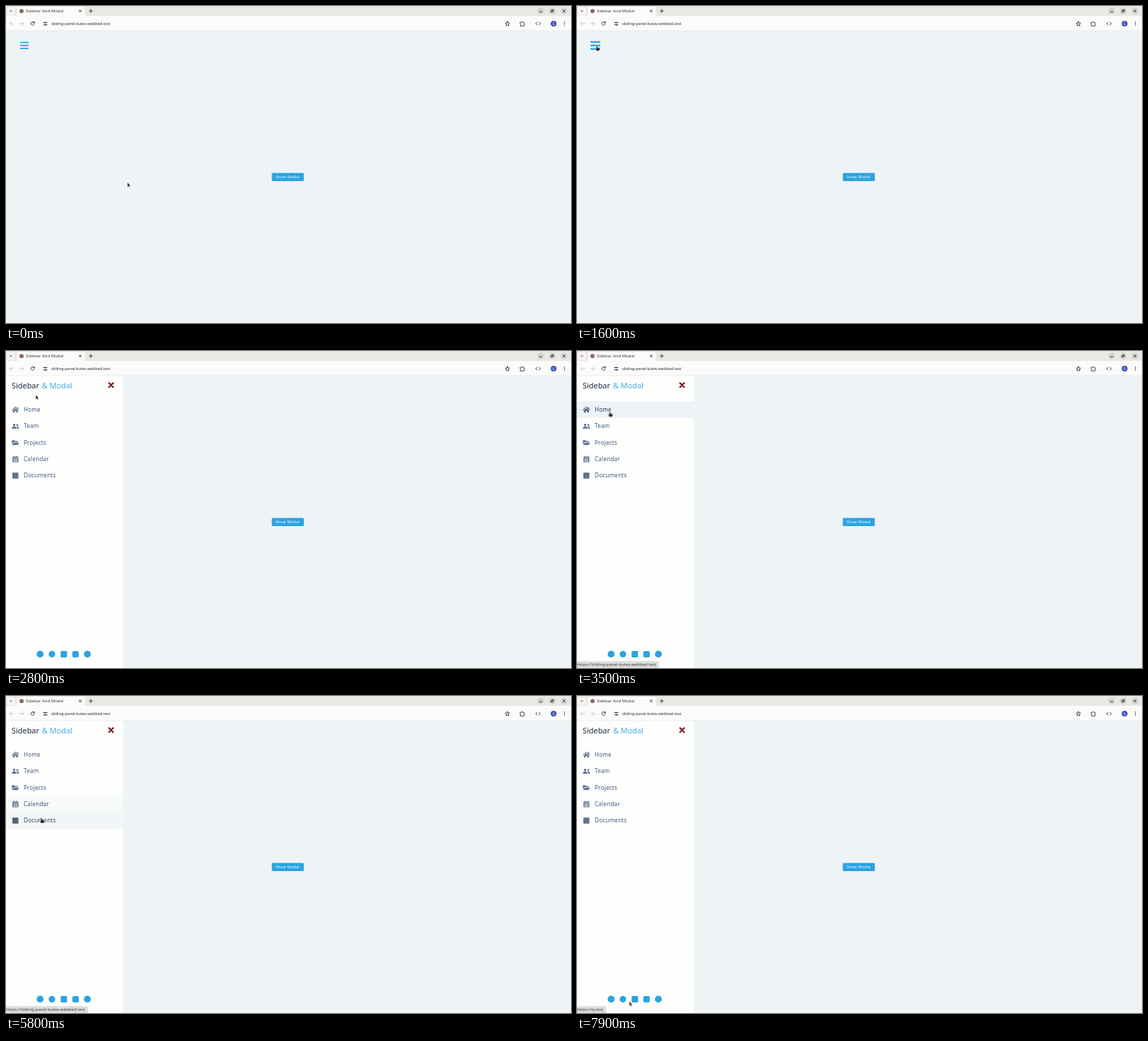
An HTML page that plays this animation: 800 by 449 pixels, repeating every 8 s.

```html
<!DOCTYPE html>
<html lang="en">
<head>
<meta charset="utf-8">
<title>Sidebar And Modal</title>
<style>
  html, body { margin: 0; width: 100%; height: 100%; overflow: hidden; background: #eef3f6; }
  svg { display: block; width: 100vw; height: 100vh; }
  text { font-family: "Noto Sans", "Open Sans", sans-serif; white-space: pre; }

  .ink { fill: none; stroke: #333; stroke-width: .9; stroke-linecap: round; stroke-linejoin: round; }
  .dim { stroke: #c2c2c0; }
  .blue { fill: #2ba3e1; }
  .title { font-size: 10.9px; font-weight: 500; fill: #1f2b3b; }
  .accent { fill: #4aa9e2; }
  .label { font-size: 8.1px; font-weight: 500; letter-spacing: .22px; }
  .status { font-size: 6.1px; fill: #3c3c3c; }

  .burger { transform-origin: 26px 55.9px; animation: bounce 2s ease-in-out infinite; }
  @keyframes bounce { 50% { transform: scale(1.5); } }

  .sidebar { animation: slide 8s infinite; }
  @keyframes slide {
    0%, 20.69% { transform: translateX(-166px); animation-timing-function: ease; }
    26.94%, 100% { transform: none; }
  }

  /* menu rows: each one lights up while the pointer is over it */
  .row { color: #455a7a; }
  .row, .back { animation: 8s ease infinite; }
  .back { fill: #edf2f6; opacity: 0; }
  .icon { fill: currentColor; opacity: .85; }
  .label { fill: currentColor; }
  .home { animation-name: home-ink; }       .home .back { animation-name: home; }
  .team { animation-name: team-ink; }       .team .back { animation-name: team; }
  .projects { animation-name: proj-ink; }   .projects .back { animation-name: proj; }
  .calendar { animation-name: cal-ink; }    .calendar .back { animation-name: cal; }
  .documents { animation-name: doc-ink; }   .documents .back { animation-name: doc; }
  @keyframes home { 0%, 38.1% { opacity: 0 } 41.9%, 47.5% { opacity: 1 } 51.3%, 100% { opacity: 0 } }
  @keyframes team { 0%, 47.5% { opacity: 0 } 51.3%, 57.4% { opacity: 1 } 61.2%, 100% { opacity: 0 } }
  @keyframes proj { 0%, 57.4% { opacity: 0 } 61.2%, 65.6% { opacity: 1 } 69.4%, 100% { opacity: 0 } }
  @keyframes cal { 0%, 65.6% { opacity: 0 } 69.4%, 71% { opacity: 1 } 74.8%, 100% { opacity: 0 } }
  @keyframes doc { 0%, 71% { opacity: 0 } 74.8%, 82% { opacity: 1 } 85.8%, 100% { opacity: 0 } }
  @keyframes home-ink { 0%, 38.1%, 51.3%, 100% { color: #455a7a } 41.9%, 47.5% { color: #2c4361 } }
  @keyframes team-ink { 0%, 47.5%, 61.2%, 100% { color: #455a7a } 51.3%, 57.4% { color: #2c4361 } }
  @keyframes proj-ink { 0%, 57.4%, 69.4%, 100% { color: #455a7a } 61.2%, 65.6% { color: #2c4361 } }
  @keyframes cal-ink { 0%, 65.6%, 74.8%, 100% { color: #455a7a } 69.4%, 71% { color: #2c4361 } }
  @keyframes doc-ink { 0%, 71%, 85.8%, 100% { color: #455a7a } 74.8%, 82% { color: #2c4361 } }

  /* link address in the corner */
  .page { animation: page 8s step-end infinite; }
  .social { animation: social 8s step-end infinite; }
  @keyframes page { 0% { visibility: hidden } 40% { visibility: visible } 84.9%, 100% { visibility: hidden } }
  @keyframes social { 0% { visibility: hidden } 93.7%, 100% { visibility: visible } }

  .pointer { animation: move 8s linear infinite; }
  @keyframes move {
    0% { transform: translate(172px, 250px) }
    2.5% { transform: translate(150px, 215px) }
    5% { transform: translate(100px, 130px) }
    7.5% { transform: translate(52px, 50px) }
    8.75% { transform: translate(38px, 29px) }
    10% { transform: translate(31px, 38px) }
    11.25% { transform: translate(28px, 50px) }
    15%, 30% { transform: translate(28px, 55.5px) }
    35% { transform: translate(42px, 62px) }
    41.25%, 42.5% { transform: translate(46px, 82px) }
    47.5% { transform: translate(47px, 95px) }
    55% { transform: translate(47px, 114px) }
    65% { transform: translate(48px, 138px) }
    71% { transform: translate(49px, 166px) }
    72.5% { transform: translate(50px, 172px) }
    76.25% { transform: translate(50px, 178px) }
    77.5%, 80% { transform: translate(54px, 179px) }
    82.5% { transform: translate(56px, 195px) }
    87.5% { transform: translate(70px, 330px) }
    91.25% { transform: translate(77px, 422px) }
    93.75% { transform: translate(67px, 428px) }
    96.25% { transform: translate(68px, 430px) }
    98.75%, 100% { transform: translate(74px, 432.5px) }
  }
  .arrow { fill: #222; animation: arrow 8s step-end infinite; }
  .hand { fill: #222; animation: hand 8s step-end infinite; }
  .pointer path { stroke: #fff; stroke-width: .5; }
  @keyframes arrow {
    0%, 24.4%, 82%, 98%, 100% { visibility: visible }
    10.6%, 38.1%, 92.9% { visibility: hidden }
  }
  @keyframes hand {
    0%, 24.4%, 82%, 98%, 100% { visibility: hidden }
    10.6%, 38.1%, 92.9% { visibility: visible }
  }
</style>
</head>
<body>
<svg viewBox="0 0 800 449" preserveAspectRatio="none">
  <rect width="800" height="449" fill="#eef3f6"/>

  <g class="burger blue">
    <rect x="20" y="50.7" width="12" height="1.9" rx=".4"/>
    <rect x="20" y="54.9" width="12" height="1.9" rx=".4"/>
    <rect x="20" y="59.2" width="12" height="1.9" rx=".4"/>
  </g>

  <rect class="blue" x="376.4" y="236.5" width="45.3" height="11.6" rx="1.4"/>
  <text x="381.7" y="244.2" font-size="5.3" letter-spacing=".36" font-weight="500" fill="#fff">Show Modal</text>

  <g class="sidebar">
    <rect y="35" width="165.5" height="414" fill="#fefffd"/>
    <text class="title" x="8" y="53.3">Sidebar</text>
    <text class="title accent" x="51" y="53.3">&amp; Modal</text>
    <path d="M145.9 45.4l5.8 5.8m0-5.8l-5.8 5.8" fill="none" stroke="#7d1c26" stroke-width="2.3" stroke-linecap="round"/>

    <g class="row home">
      <rect class="back" y="71.4" width="165.5" height="23.4"/>
      <path class="icon" transform="translate(13.3 83)" d="M-5.2.2L0-4.2 2.6-2V-3.6H3.8V-1L5.2.2 4.6.9 0-3-4.6.9ZM-3.5 1L0-2 3.5 1V4H1V1.5H-1V4H-3.5Z"/>
      <text class="label" x="25" y="85.9">Home</text>
    </g>
    <g class="row team">
      <rect class="back" y="94.8" width="165.5" height="23.4"/>
      <path class="icon" transform="translate(13.3 106.3)" d="M-3.6-1.6a1.8 1.8 0 1 1 3.6 0a1.8 1.8 0 1 1-3.6 0ZM-5 3.6Q-5 .8-3 .8H-.6Q1.4.8 1.4 3.6ZM1.4-1.3a1.4 1.4 0 1 1 2.8 0a1.4 1.4 0 1 1-2.8 0ZM2.3 3.6H5V2.6Q5 .9 3.4.9H1.5Q2.4 1.9 2.3 3.6Z"/>
      <text class="label" x="25" y="109.2">Team</text>
    </g>
    <g class="row projects">
      <rect class="back" y="118.2" width="165.5" height="23.4"/>
      <path class="icon" transform="translate(13.3 129.7)" d="M-5 2.6V-2.6Q-5-3.4-4.2-3.4H-1.6L-.4-2.2H2.6Q3.4-2.2 3.4-1.4V-.6H-2.8ZM-4.6 3.5L-2.5 0H5.3L3.3 3.5Z"/>
      <text class="label" x="25" y="132.6">Projects</text>
    </g>
    <g class="row calendar">
      <rect class="back" y="141.6" width="165.5" height="23.4"/>
      <g transform="translate(13.3 153)">
        <path class="icon" d="M-4.2-3.3H-2.7V-4.6H-1.5V-3.3H1.5V-4.6H2.7V-3.3H4.2V-1.6H-4.2ZM-4.2-1H4.2V4.5H-4.2Z"/>
        <path d="M-3.3.8H3.3M-3.3 2.8H3.3M-1.3-.5V4M1.3-.5V4" stroke="#fefffd" stroke-width=".6"/>
      </g>
      <text class="label" x="25" y="155.9">Calendar</text>
    </g>
    <g class="row documents">
      <rect class="back" y="165" width="165.5" height="23.4"/>
      <rect class="icon" x="9" y="172.2" width="8.6" height="8.6" rx=".8"/>
      <text class="label" x="25" y="179.3">Documents</text>
    </g>

    <g class="blue">
      <circle cx="48.3" cy="429.4" r="4.9"/>
      <circle cx="65" cy="429.4" r="4.6"/>
      <rect x="77.4" y="424.9" width="9" height="9" rx=".8"/>
      <rect x="94" y="424.9" width="9" height="9" rx="2"/>
      <circle cx="115.2" cy="429.4" r="4.9"/>
    </g>
  </g>

  <g class="page">
    <path d="M0 439.3H114.5Q116 439.3 116 441V449H0Z" fill="#dddddb"/>
    <text class="status" x="0" y="446.3">https://sliding-panel-kutev.webbed.test</text>
  </g>
  <g class="social">
    <path d="M0 439.3H40Q41.5 439.3 41.5 441V449H0Z" fill="#dddddb"/>
    <text class="status" x="0" y="446.3">https://q.test</text>
  </g>

  <!-- browser frame -->
  <rect width="800" height="15" fill="#e9e8e5"/>
  <rect y="14" width="800" height="21" fill="#fbfbfa"/>
  <rect y="34.6" width="800" height=".6" fill="#e2e4e4"/>
  <rect x="1" y="1.5" width="11.5" height="11.5" rx="3" fill="#f6f5f3"/>
  <path d="M13 14.2Q15.5 14.2 15.5 12V4Q15.5 1.3 18.2 1.3H109Q111.7 1.3 111.7 4V12Q111.7 14.2 114.2 14.2Z" fill="#fbfbfa"/>
  <circle cx="22" cy="7.2" r="2.9" fill="#8a6567"/>
  <text x="28" y="9.3" font-size="6" fill="#3a3a3a">Sidebar And Modal</text>
  <g class="ink">
    <path d="M5.2 6.5L6.8 8 8.4 6.5"/>
    <path d="M103.6 5.6l3 3m0-3l-3 3M117.7 7.1h4.8m-2.4-2.4v4.8"/>
  </g>
  <g fill="#d3d2d0">
    <circle cx="757" cy="7" r="4.6"/>
    <circle cx="773.5" cy="7" r="4.6"/>
    <circle cx="790" cy="7" r="4.6"/>
  </g>
  <g class="ink">
    <path d="M755.3 8.2h3.4M788.5 5.5l3 3m0-3l-3 3"/>
    <rect x="772" y="6.4" width="2.2" height="2.2"/>
    <path d="M773.2 5.4h1.9v1.9"/>
  </g>

  <g class="ink">
    <path class="dim" d="M10.6 25H5.2m2.4-2.4L5.2 25l2.4 2.4M19.4 25h5.4m-2.4-2.4l2.4 2.4-2.4 2.4"/>
    <path d="M39.8 23.3A2.5 2.5 0 1 0 40.2 25.8M40.3 22.2V24H38.4"/>
    <path d="M53 23.5h1.4M56.3 23.5h1.9M53 26.7h1.9M56.8 26.7h1.4"/>
    <circle cx="55.3" cy="23.5" r=".8"/>
    <circle cx="55.9" cy="26.7" r=".8"/>
    <path d="M710 22l.9 2.1 2.3.2-1.7 1.5.5 2.3-2-1.2-2 1.2.5-2.3-1.7-1.5 2.3-.2Z"/>
    <path d="M728.2 23.2h1.6a1 1 0 0 1 2 0h1.6v1.6a1 1 0 0 1 0 2v1.5h-5.2v-1.6a1 1 0 0 0 0-1.9Z"/>
    <path d="M751.9 23L750 25l1.9 2M754.7 23l1.9 2-1.9 2"/>
  </g>
  <text x="64" y="27.2" font-size="5.6" fill="#2d2d2d">sliding-panel-kutev.webbed.test</text>
  <circle cx="775.4" cy="25" r="4.1" fill="#3f51b5"/>
  <text x="775.4" y="26.6" font-size="4.4" fill="#fff" text-anchor="middle">G</text>
  <g fill="#333">
    <circle cx="790.7" cy="22.7" r=".7"/>
    <circle cx="790.7" cy="25" r=".7"/>
    <circle cx="790.7" cy="27.3" r=".7"/>
  </g>

  <g class="pointer">
    <path class="arrow" d="M0 0V6.6L1.6 5.2 2.7 7.8 3.8 7.3 2.7 4.8H4.7Z"/>
    <path class="hand" d="M-.8.8a.8.8 0 0 1 1.6 0V3L3.4 3.5Q4.2 3.7 4.2 4.5V6L3.4 8H-.6L-2.3 5.3Q-2.6 4.4-1.8 4.5L-.8 5.3Z"/>
  </g>
</svg>
</body>
</html>
```
